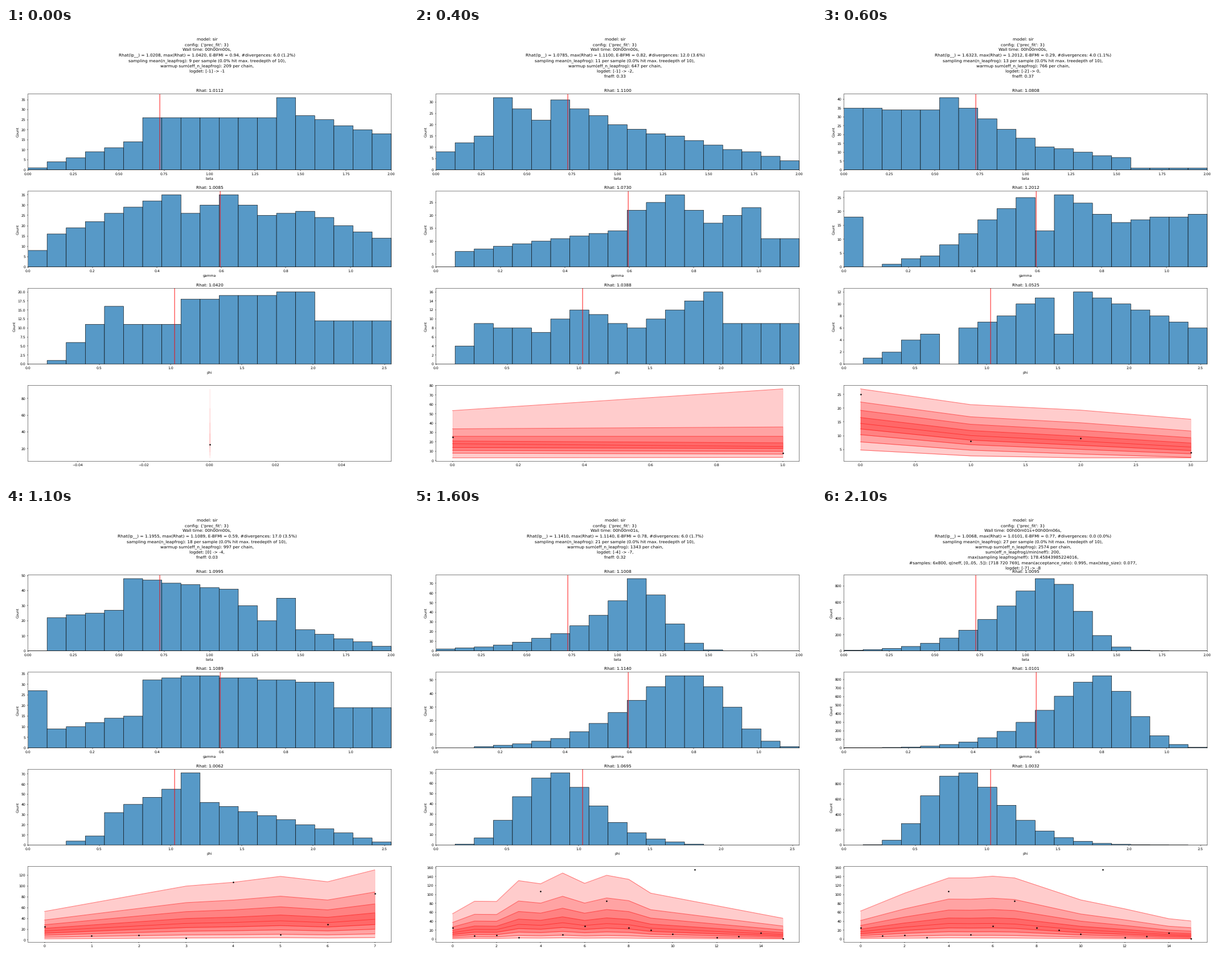
A matplotlib script for the animation above (2.6 s loop, 706x794 px).

```python
import numpy as np
import matplotlib.pyplot as plt
from matplotlib.animation import FuncAnimation

W, H, DPI = 706, 794, 44.125
BINS = 19
STEP = 100          # ms per tick
TICKS = 26

plt.rcParams["text.hinting"] = "none"
plt.rcParams["path.snap"] = False
fig = plt.figure(figsize=((W + 0.01) / DPI, (H + 0.01) / DPI), dpi=DPI)


def panel(k):
    top = 115.7 + 170.25 * k
    return fig.add_axes([38.6 / W, 1 - (top + 132.9) / H, 638 / W, 132.9 / H])


axes = [panel(k) for k in range(4)]
# name, upper limit, true value
PARAMS = [("beta", 2.0, 0.7257), ("gamma", 1.127, 0.5963), ("phi", 2.548, 1.0283)]
OBSERVED = [25, 8, 9, 4, 107, 10, 29, 86, 25, 20, 12, 155, 4, 6, 14, 1]
# band edges from widest to narrowest and back, relative to the top edge
SHARES = np.array([1, 0.65, 0.47, 0.34, 0.25, 0.18, 0.12, 0.063, 0.022])
bins = np.arange(BINS)
scenes = []


def keyed(*points):
    """Bin counts on straight runs between (bin, count) points."""
    x, y = zip(*points)
    return np.round(np.interp(bins, x, y, left=0))


def bell(peak, centre, left, right, p_left=1.5, p_right=2):
    """Lopsided bell: own width and falloff power on each side."""
    d = bins - centre
    z = np.where(d < 0, (np.abs(d) / left) ** p_left, (np.abs(d) / right) ** p_right)
    y = np.exp(-z)
    return np.round(peak * y / y.max())


def fan(last, spread, floor, *points):
    """Bands under a keyed top edge; the spread changes evenly along x."""
    x = np.arange(last + 1)
    top = np.interp(x, *zip(*points))
    return np.maximum(top * SHARES[:, None] ** np.linspace(*spread, last + 1), floor)


def scene(stats, extra, rhats, hists, bands, wall="00h00m00s"):
    lp, bfmi, div, leaps, warm = stats
    head = [
        "model: sir",
        "config: {'prec_fit': 3}",
        f"Wall time: {wall},",
        f"Rhat(lp__) = {lp:.4f}, max(Rhat) = {max(rhats):.4f}, "
        f"E-BFMI = {bfmi:.2f}, #divergences: {div}",
        f"sampling mean(n_leapfrog): {leaps} per sample "
        "(0.0% hit max. treedepth of 10),",
        f"warmup sum(eff_n_leapfrog): {warm} per chain,",
    ]
    scenes.append((head + extra, rhats, hists, bands))


scene((1.0208, 0.94, "6.0 (1.2%)", 9, 209),
      ["logdet: [-1] -> -1"],
      (1.0112, 1.0085, 1.0420),
      (keyed((0, 1), (5, 14), (6, 26), (12, 26), (13, 36), (14, 27), (18, 18)),
       keyed((0, 8), (1, 16), (7, 35), (8, 26), (10, 35), (12, 25), (14, 27), (18, 14)),
       keyed((1, 1), (4, 16), (5, 11), (7, 11), (8, 18), (14, 20), (15, 12))),
      np.geomspace(91.6, 9.1, 9)[:, None])

scene((1.0785, 0.82, "12.0 (3.6%)", 11, 647),
      ["logdet: [-1] -> -2,", "fneff: 0.33"],
      (1.1100, 1.0730, 1.0388),
      (keyed((0, 8), (2, 15), (3, 32), (5, 22), (6, 31), (9, 20), (18, 4)),
       keyed((1, 6), (9, 14), (10, 22), (12, 28), (14, 17), (16, 23), (17, 11)),
       keyed((1, 4), (2, 9), (5, 7), (7, 12), (10, 8), (14, 16), (15, 9))),
      np.transpose([[53.5, 34, 26, 21, 18, 14, 11, 8, 3],
                    [76.7, 36, 26, 19, 15, 13, 10, 7, 3.5]]))

scene((1.6323, 0.29, "4.0 (1.1%)", 13, 766),
      ["logdet: [-2] -> 0,", "fneff: 0.37"],
      (1.0808, 1.2012, 1.0525),
      (keyed((0, 35), (4, 34), (5, 41), (8, 23), (10, 13), (14, 7), (15, 1)),
       keyed((0, 18), (1, 0), (4, 4), (9, 25), (10, 13), (11, 26), (14, 16), (18, 19)),
       keyed((1, 1), (4, 5), (5, 0), (6, 6), (10, 11), (11, 5), (12, 12), (18, 6))),
      fan(3, (0.45, 0.72), 2, (0, 27), (1, 21.3), (2, 19.3), (3, 16)))

scene((1.1955, 0.59, "17.0 (3.5%)", 18, 997),
      ["logdet: [0] -> -4,", "fneff: 0.03"],
      (1.0995, 1.1089, 1.0062),
      (keyed((1, 22), (4, 27), (5, 48), (10, 41), (12, 20), (13, 35), (14, 14), (18, 3)),
       keyed((0, 27), (1, 9), (5, 15), (6, 32), (8, 34), (15, 31), (16, 19)),
       keyed((1, 0), (3, 9), (4, 32), (7, 55), (8, 71), (9, 42), (18, 3))),
      fan(7, (0.83, 0.88), 2,
          (0, 53), (3, 100), (4, 107), (5, 118), (6, 108), (7, 130)))

scene((1.1410, 0.78, "6.0 (1.7%)", 21, 1343),
      ["logdet: [-4] -> -7,", "fneff: 0.32"],
      (1.1008, 1.1140, 1.0695),
      (bell(75, 10, 2.8, 2, p_left=1),
       bell(53, 12.3, 4, 3.3, p_right=2.5),
       bell(70, 6, 2.9, 2.75, 2.5, 1.5)),
      fan(15, (0.97, 1.07), 1,
          (0, 57), (1, 85), (2, 84.5), (3, 131), (4, 124), (5, 148), (6, 125),
          (7, 143), (8, 134), (9, 103), (12, 75), (15, 47)),
      wall="00h00m01s")

scene((1.0068, 0.77, "0.0 (0.0%)", 27, 2574),
      ["sum(eff_n_leapfrog)/min(neff): 200,",
       "max(sampling leapfrog/neff): 178.45843985224016,",
       "#samples: 6x800, q(neff, [0,.05, .5]): [718 720 769], "
       "mean(acceptance_rate): 0.995, max(step_size): 0.077,",
       "logdet: [-7] -> -8"],
      (1.0095, 1.0101, 1.0032),
      (bell(890, 10.3, 3.65, 2.15),
       bell(842, 12.8, 3.7, 2.4),
       bell(943, 5.9, 2.7, 2.95, 2.7, 1.5)),
      fan(15, (0.95, 1.07), 1,
          (0, 63), (2, 103), (4, 137), (5, 137), (6, 141), (7, 137), (10, 88),
          (12, 68), (14, 46), (15, 41)),
      wall="00h00m01s+00h00m06s")


def draw_hist(ax, param, rhat, counts):
    name, top, truth = param
    width = top / BINS
    ax.clear()
    ax.bar(bins * width, counts, width, align="edge",
           facecolor="#5799c7", edgecolor="black", linewidth=1)
    ax.axvline(truth, color="r")
    ax.set_xlim(0, top)
    ax.set(title=f"Rhat: {rhat:.4f}", xlabel=name, ylabel="Count")


def draw_bands(ax, bands):
    ax.clear()
    x = np.arange(bands.shape[1])
    for k in range(4):
        ax.fill_between(x, bands[8 - k], bands[k], color="r", alpha=0.2)
    for row in bands:
        ax.plot(x, row, color="r", alpha=0.5)
    ax.plot(x, OBSERVED[:len(x)], "k.")


def draw(i):
    head, rhats, hists, bands = scenes[0 if i == 0 else 1 + (i - 1) // 5]
    for text in list(fig.texts):
        text.remove()
    for k, line in enumerate(head):
        fig.text(0.5, 1 - (22.1 + 9.22 * k) / H, line, fontsize=12,
                 ha="center", va="baseline")
    for ax, param, rhat, counts in zip(axes, PARAMS, rhats, hists):
        draw_hist(ax, param, rhat, counts)
    draw_bands(axes[3], bands)
    return []


anim = FuncAnimation(fig, draw, frames=TICKS, init_func=lambda: draw(0),
                     interval=STEP, repeat=True, repeat_delay=0)
plt.show()
```
